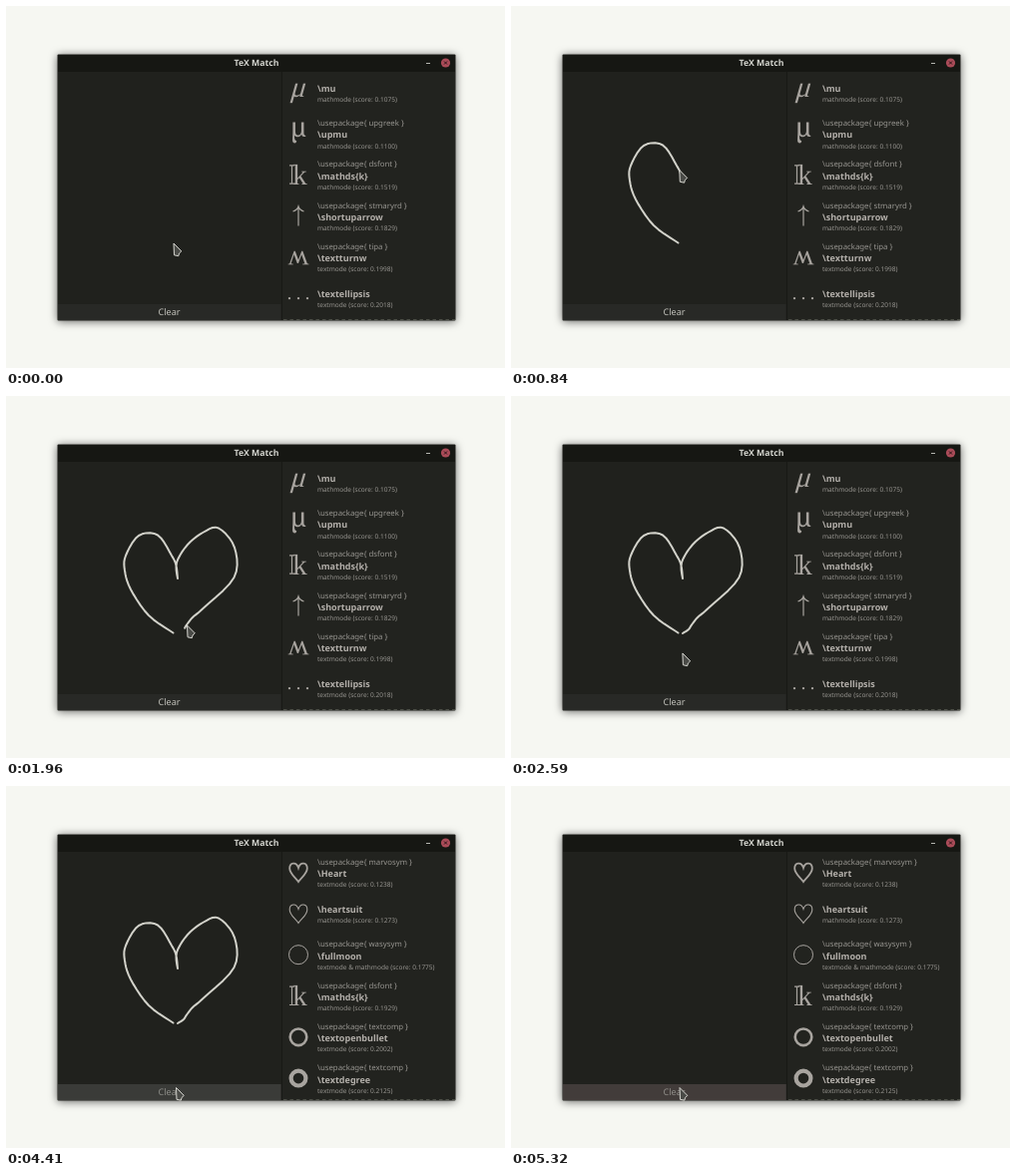
Animation, 500 px wide and 363 px high, one loop 5460 ms. Source, as an HTML page:

```html
<!DOCTYPE html>
<html lang="en">
<head>
<meta charset="utf-8">
<title>TeX Match</title>
<style>
  html, body { margin: 0; width: 100%; height: 100%; overflow: hidden; background: #f6f7f2; }
  svg { display: block; width: 500px; height: 363px; }
  text { font-family: "Noto Sans", sans-serif; text-rendering: geometricPrecision; }
  .window { filter: drop-shadow(0 1px 4px rgba(0, 0, 0, .6)); }
  .pkg { font-size: 7.8px; fill: #989691; }
  .name { font-size: 9px; font-weight: bold; fill: #b4b0ab; }
  .mode { font-size: 6.54px; fill: #989691; }
  .icon { fill: none; stroke: #a8a49f; stroke-width: 1.2; }
  .icon text, .icon .solid { fill: #a8a49f; stroke: none; text-anchor: middle; }
  .icon text { font-family: "Liberation Serif", serif; }
  .icon .wide { font-family: "Noto Serif", serif; }
</style>
</head>
<body>
<svg viewBox="0 0 500 363">
  <g class="window">
    <rect x="51.5" y="48.5" width="399" height="267" rx="1" fill="#20211d"/>
  </g>
  <path d="M52 66V49H450V66Z" fill="#161713"/>
  <rect x="276" y="66" width="174" height="249" fill="#22231f"/>
  <path d="M276.5 66V315" stroke="#181915"/>
  <text x="251" y="60.3" text-anchor="middle" font-size="8.7" font-weight="bold" fill="#d3d4ce">TeX Match</text>
  <path d="M421 57.5h4" stroke="#b5b6b0"/>
  <circle cx="440.5" cy="57" r="4.6" fill="#aa4b58"/>
  <path d="M439 55.5l3 3m0-3l-3 3" stroke="#2a1518"/>
  <g>
    <path d="M52 299H275.5V315H52Z" fill="#282926"/>
    <path id="hover" d="M52 299H275.5V315H52Z" fill="#3a3b38"/>
    <path id="press" d="M52 299H275.5V315H52Z" fill="#423c3a"/>
  </g>
  <text id="label" x="163.5" y="310.4" text-anchor="middle" font-size="9.1" fill="#c0c0ba">Clear</text>
  <path d="M278 314.5H450" stroke="#4b4d45" stroke-dasharray="3.5 3"/>
  <g id="before"></g>
  <g id="after"></g>
  <path id="ink" fill="none" stroke="#d2d2ca" stroke-width="2" stroke-linecap="round" stroke-linejoin="round"/>
  <path id="cursor" d="M.5 .5L1 12.3L5.3 13.2L6 10.5L8.3 8.4Z" fill="#4a4b47" stroke="#d6d6d0" stroke-linejoin="round"/>
</svg>
<script>
const LOOP = 5460;
const $ = id => document.getElementById(id);
const clamp = x => Math.max(0, Math.min(1, x));

const heart = w => `<path stroke-width="${w}" d="M0 9.5C-3 5-8.8 1.5-8.8-4C-8.8-10-2-11 0-4.5C2-11 8.8-10 8.8-4C8.8 1.5 3 5 0 9.5Z"/>`;
const ring = (r, w) => `<circle r="${r}" stroke-width="${w}"/>`;
const dot = x => `<circle class="solid" cx="${x}" r="1.2"/>`;
const blackboardK = '<text x="1.5" y="9.5" font-size="29">k</text><path d="M-6.5-9.5V9M-9 9H-2M-9-9.3H-4"/>';

const results = {
  before: [
    ['', 'mu', 'mathmode', '0.1075', '<text y="4" font-size="29" font-style="italic" transform="skewX(-6)">μ</text>'],
    ['upgreek', 'upmu', 'mathmode', '0.1100', '<text class="wide" y="3.5" font-size="27">μ</text>'],
    ['dsfont', 'mathds{k}', 'mathmode', '0.1519', blackboardK],
    ['stmaryrd', 'shortuparrow', 'mathmode', '0.1829', '<path d="M0 10V-9M-5.5-4.5Q-1-6 0-9.5Q1-6 5.5-4.5"/>'],
    ['tipa', 'textturnw', 'textmode', '0.1998', '<text transform="translate(0 -6) rotate(180)" font-size="29">w</text>'],
    ['', 'textellipsis', 'textmode', '0.2018', dot(-9) + dot(0) + dot(9)]
  ],
  after: [
    ['marvosym', 'Heart', 'textmode', '0.1238', heart(1.8)],
    ['', 'heartsuit', 'mathmode', '0.1273', heart(1.1)],
    ['wasysym', 'fullmoon', 'textmode &amp; mathmode', '0.1775', ring(9.5, 1)],
    ['dsfont', 'mathds{k}', 'mathmode', '0.1929', blackboardK],
    ['textcomp', 'textopenbullet', 'textmode', '0.2002', ring(8.3, 2.6)],
    ['textcomp', 'textdegree', 'textmode', '0.2125', ring(7.4, 4.2)]
  ]
};

function row([pkg, name, mode, score, icon], i) {
  const y = 86.6 + i * 41.3, shift = pkg ? 0 : -5.4;
  const line = (cls, dy, s) => `<text class="${cls}" x="312" y="${y + dy}">${s}</text>`;
  return `<g class="icon" transform="translate(293 ${y})">${icon}</g>`
    + (pkg && line('pkg', -8, `\\usepackage{ ${pkg} }`))
    + line('name', 4.5 + shift, '\\' + name)
    + line('mode', 14.6 + shift, `${mode} (score: ${score})`);
}
for (const id in results) $(id).innerHTML = results[id].map(row).join('');

// Key points of the drawn heart, evenly spaced in time and joined by a Catmull-Rom curve
const keys = [
  [167.5, 237.5], [143, 220], [125, 194], [119, 175], [120, 160], [133, 140], [152, 139.5],
  [166, 160], [170.5, 170], [172, 183], [171, 167], [182, 149], [198, 136.5], [213, 132.5],
  [229, 152], [228.5, 182], [198, 212.5], [187, 222], [181, 229.5], [178, 234], [172, 238]
];
const last = keys.length - 1;
const key = i => keys[Math.max(0, Math.min(last, i))];

function curve(u) {
  const i = Math.min(Math.floor(u), last - 1), f = u - i;
  const [a, b, c, d] = [-1, 0, 1, 2].map(k => key(i + k));
  return [0, 1].map(k => b[k] + f / 2 * (c[k] - a[k]
    + f * (2 * a[k] - 5 * b[k] + 4 * c[k] - d[k] + f * (3 * (b[k] - c[k]) + d[k] - a[k]))));
}

function inkPath(end) {
  let d = 'M' + curve(0);
  for (let u = .2; u < end; u += .2) d += 'L' + curve(u);
  return d + 'L' + curve(end);
}

const STEP = 70;
// The screen refreshes on two of every three steps
const snap = t => t - t % (3 * STEP) + (t % (3 * STEP) < STEP ? 0 : STEP);
const penAt = t => last * clamp((t - STEP) / 2100);

function draw(t) {
  const s = snap(t);
  const [x, y] = curve(penAt(s));
  const glide = clamp((s - 2450) / 350) ** 1.3;
  const hover = clamp((s - 2660) / 140);
  const press = clamp((s - 5040) / 210);

  // The ink runs one step ahead of the pointer
  $('ink').setAttribute('d', s > STEP && press < 1 ? inkPath(penAt(s + STEP)) : '');
  $('cursor').setAttribute('transform', `translate(${x - 2 * glide - 1.5 * press} ${y + 64 * glide})`);
  $('hover').style.opacity = hover;
  $('press').style.opacity = press;
  $('label').style.opacity = 1 - .4 * hover;
  $('before').style.display = hover ? 'none' : '';
  $('after').style.display = hover ? '' : 'none';
}

const start = performance.now();
function tick() {
  draw((performance.now() - start) % LOOP);
  requestAnimationFrame(tick);
}
tick();
</script>
</body>
</html>
```
